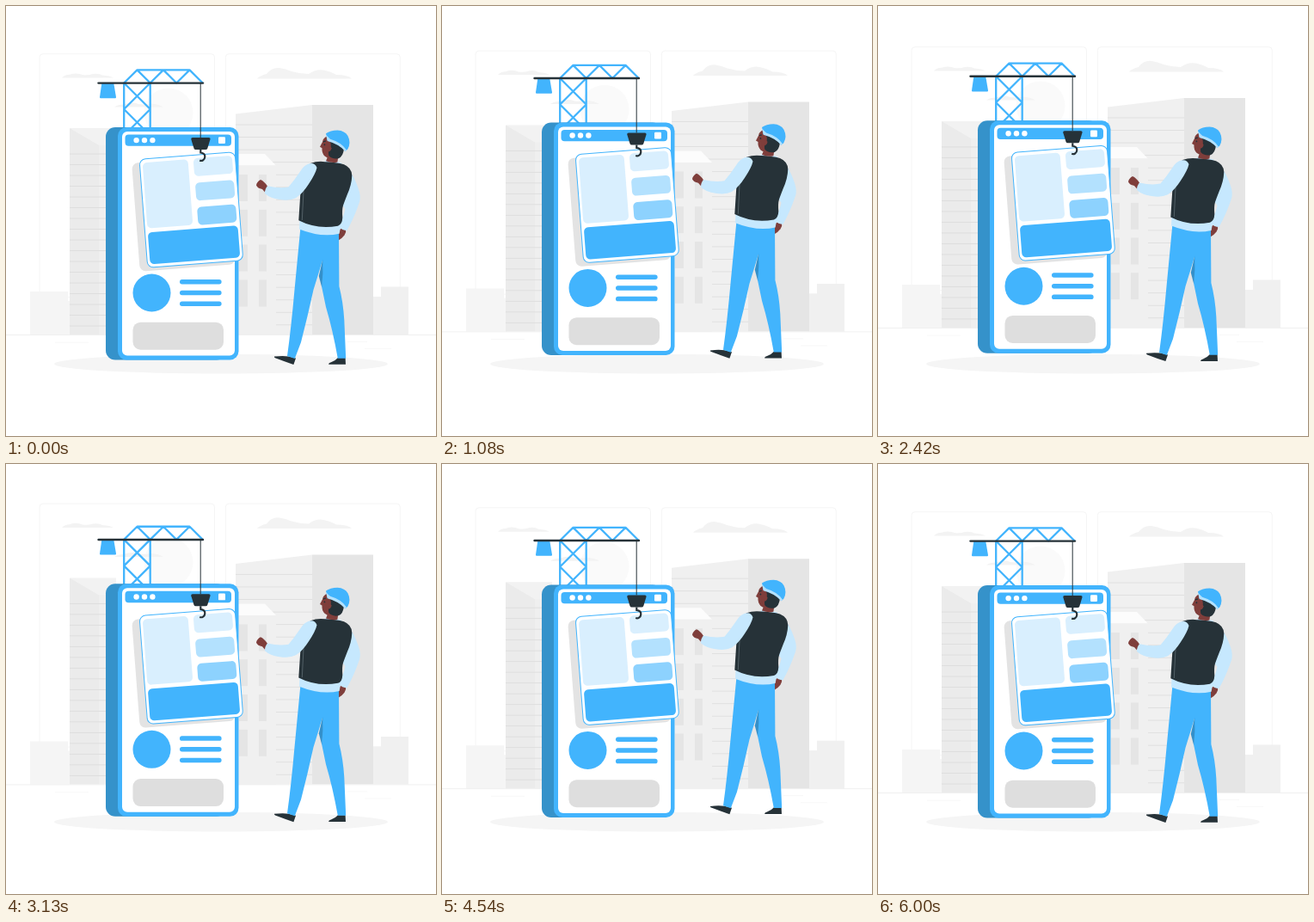
An HTML page for the animation above (6.04 s loop, 500 px wide and 500 px high).

```html
<!DOCTYPE html>
<html lang="en">
<head>
<meta charset="utf-8">
<title>Building an app</title>
<style>
  html, body { margin: 0; width: 100%; height: 100%; overflow: hidden; background: #fff; }
  svg { display: block; width: 100%; height: 100%; }
  .blue { fill: #42b4fd; }
  .dark { fill: #263238; }
  .skin { fill: #7f3e3b; }
  .shirt { fill: #c6e8fe; }
  .white { fill: #fff; }
</style>
</head>
<body>
<svg viewBox="0 0 500 500">
  <g id="city">
    <g fill="none" stroke="#f5f5f5">
      <rect x="39" y="55.7" width="203.5" height="283" rx="4"/>
      <rect x="255.3" y="55.7" width="203" height="283" rx="4"/>
    </g>
    <circle cx="189" cy="124" r="28.5" fill="#fafafa"/>
    <g fill="#f3f3f3">
      <path d="M65 83.5Q68 80 74 79.8Q82 77 89 80Q95 81 101 79Q108 78 112 80.5Q121 81 125 83.5Z"/>
      <path d="M292 84.5Q295 81 303 79Q309 71 318 72Q325 73 332 76Q342 79 352 79Q360 73 369 74.5Q378 76 384 80Q398 80 402 84.5Z"/>
      <path d="M126 117.5Q130 114.5 137 114.5Q146 111 154 114Q162 115 168 113.5Q178 114 183 117.5Z"/>
    </g>
    <path d="M28 332H72V343H76V382H28Z" fill="#f5f5f5"/>
    <path d="M74 142H128V170H108Z" fill="#f2f2f2"/>
    <path d="M74 142L108 162V382H74Z" fill="#ebebeb"/>
    <path d="M108 162H128V382H108Z" fill="#efefef"/>
    <path id="leftLines" fill="none" stroke="#dedede"/>
    <path d="M427 338H436V326.5H468V382H427Z" fill="#f0f0f0"/>
    <path d="M267 125.5L356 115V382H267Z" fill="#f0f0f0"/>
    <path d="M356 115H427V382H356Z" fill="#e5e5e5"/>
    <path id="rightLines" fill="none" stroke="#e0e0e0"/>
    <path d="M260 172H301L314 185.5H260Z" fill="#fcfcfc"/>
    <path d="M260 185.5H314V382H260Z" fill="#f0f0f0"/>
    <path id="panes" fill="#e5e5e5"/>
    <path d="M0 382.5H500" stroke="#ededed" stroke-width=".8"/>
    <path d="M57 391.2H96M417 398.6H448M397 390.5H420" stroke="#f3f3f3" stroke-width=".6"/>
  </g>

  <ellipse cx="250" cy="416.2" rx="194" ry="11.3" fill="#f5f5f5"/>

  <g id="phone">
    <g fill="none" stroke="#42b4fd" stroke-width="2.3" stroke-linejoin="round">
      <path d="M137.2 89V145M167.7 89V145M137.2 89.5L167.7 120L137.2 150.5M167.7 89.5L137.2 120L167.7 150.5"/>
      <path d="M137.2 89.5L152.5 74.4L167.7 89.5L183 74.4L198.2 89.5L213.5 74.4L228.7 89.5M152.5 74.4H213.5"/>
    </g>
    <path class="blue" d="M111.3 90H125.3L128 106Q128 107.2 127 107.2H110Q109 107.2 109 106Z"/>
    <path d="M107.5 89.6H229" stroke="#263238" stroke-width="2.4" stroke-linecap="round"/>

    <rect x="116" y="141" width="140" height="270.5" rx="11" fill="#3592ca"/>
    <rect class="blue" x="130" y="141" width="140.5" height="270.5" rx="10"/>
    <rect class="white" x="135" y="146" width="131" height="260.5" rx="6"/>
    <rect class="blue" x="138.5" y="149.5" width="123.5" height="13.3" rx="4"/>
    <g class="white">
      <circle cx="151.6" cy="156.1" r="3.2"/>
      <circle cx="161" cy="156.1" r="3.2"/>
      <circle cx="170.4" cy="156.1" r="3.2"/>
      <rect x="247" y="152.2" width="8" height="7.8" rx="1.2"/>
    </g>
    <circle class="blue" cx="169.5" cy="333.5" r="22"/>
    <g class="blue">
      <rect x="202" y="318" width="48.6" height="5.5" rx="2.7"/>
      <rect x="202" y="330.7" width="48.6" height="5.5" rx="2.7"/>
      <rect x="202" y="343.4" width="48.6" height="5.5" rx="2.7"/>
    </g>
    <rect x="147.5" y="367.7" width="105.5" height="32" rx="9" fill="#dedede"/>

    <rect x="-55.7" y="-63.2" width="111.4" height="126.4" rx="7" fill="#e3e3e3" transform="translate(206.5 241.5) rotate(-4.4)"/>
    <g transform="translate(215.4 237) rotate(-4.4)">
      <rect x="-55.7" y="-63.2" width="111.4" height="126.4" rx="7" fill="#fff" stroke="#42b4fd"/>
      <rect x="-52.4" y="-58.9" width="53" height="76.6" rx="5" fill="#d9effe"/>
      <rect x="6.8" y="-59.4" width="45.2" height="21" rx="5" fill="#d9effe"/>
      <rect x="6.8" y="-31" width="45.2" height="21" rx="5" fill="#b3e1fe"/>
      <rect x="6.8" y="-2.6" width="45.2" height="21" rx="5" fill="#8dd2fe"/>
      <rect class="blue" x="-52.5" y="22.3" width="105" height="37.2" rx="5"/>
    </g>

    <path d="M226.2 90V153" stroke="#263238"/>
    <path class="dark" d="M217 153H235.8Q238 153 237.5 155L234.3 165.5Q233.8 167 232 167H220.6Q219 167 218.5 165.5L215.3 155Q214.8 153 217 153Z"/>
    <path d="M226.3 167V170.5C230 171 231.5 173 231.3 175.5C231 179 228 180.6 225.2 179.6" fill="none" stroke="#263238" stroke-width="2.2"/>
  </g>

  <g id="man">
    <path class="dark" d="M312 407.6Q322 406.5 328.5 407.5L337 409.5L334.4 417Q324 413.5 313 409.3Q311.5 408.5 312 407.6Z"/>
    <path class="dark" d="M375.2 416.8Q375 415 378 414.3Q383 412.5 386 409H394.6L395 416.8Z"/>
    <path class="skin" d="M386 262Q390 256.5 395 259.5Q396 263 393.5 266.5Q391 270 386.5 272.5Z"/>
    <path class="blue" d="M342.5 257L387 262L387.4 326Q392 344 393.3 365L395.2 409.7H385.8Q380 377 372 350L367 326L368 296L357.5 330Q351 360 343 391L335.8 410L327 407Q331.5 375 335.5 330Z"/>
    <path d="M368.2 295L363.8 314L367.2 327Q369 310 368.2 295Z" fill="#3490ca"/>
    <path class="shirt" d="M398 190Q405 198 410 213Q413 222 411 228Q405 246 396.5 261Q391 261 387 256.5Q393 244 394.5 236L389 228L395 210Z"/>
    <path class="shirt" d="M341.5 248L390 252L387.6 264.8Q366 269.5 341 259.5Z"/>
    <path class="shirt" d="M371.5 179.5Q381 179 390 182.5L391 186L369 184Z"/>
    <path class="dark" d="M354 183Q362 180 371 181.2Q384 181.5 393 184.2Q402 188 402.3 197Q402 208 396.5 220Q393 229 392 232Q390.5 237 391.3 246Q391 254 386 255.7Q361 260 340.3 249.3L342.2 220L347 194Z"/>
    <path d="M346.2 211L344.3 249" stroke="#718087" stroke-width=".6"/>
    <path class="skin" d="M304 209.5Q300 203.5 296 202Q291.5 204.5 291 208.5Q292.5 212 298 213L301.5 217Z"/>
    <path class="shirt" d="M352 183.5Q359 181.5 361.5 188Q360 195 352 207Q345 218 337 223.2Q330 227 318 225Q307 223.5 301 218Q300.8 213 304 209.3Q318 212.5 328.5 210.5Q335 203 342 192.5Q346.5 185 352 183.5Z"/>
    <path class="skin" d="M374 151Q368 154 368.3 157.5L365 163.8L367.5 165.3Q367 171 370.5 174.6Q373 176.2 373.6 176.5L372 180.3Q379 183 385.4 181.5L387 170L386 156Z"/>
    <path class="dark" d="M376 156Q390 160 393 166Q392 175 386.7 177.2Q379 178.5 375.2 173.7Q374.2 168 377.5 164.7Q378.7 160.5 376 156Z"/>
    <path class="skin" d="M374.5 164Q377.7 162.5 378.5 165.3Q378 169 375 169.3Z"/>
    <path d="M368.8 157.8L371.8 157M369.8 160.5L371 162" fill="none" stroke="#263238" stroke-width="1.3"/>
    <path class="blue" d="M372 148.3Q377 144.5 385.5 144.5Q394 145 397.5 151Q401.5 159 397.3 166.5L394.5 169Q388 160 373.5 156Z"/>
    <path d="M372 149.5Q374.5 152.5 377 154.7Q390 158.5 396 167.4L394.5 169Q387 160.5 373.7 157Z" fill="#b3e1fe"/>
  </g>
</svg>
<script>
  const LOOP = 6040;
  const RATE = 24 / 1000;
  const RISE = 10;
  const byId = id => document.getElementById(id);

  // Joins one path fragment per index
  const repeat = (count, draw) => Array.from({ length: count }, (_, i) => draw(i)).join('');

  byId('leftLines').setAttribute('d', repeat(17, i => `M74 ${172 + 12.5 * i}H116`));
  byId('rightLines').setAttribute('d', repeat(17, i => `M267 ${138 + 14.55 * i}H356`));
  byId('panes').setAttribute('d', repeat(4, i => {
    const y = 196 + 40.8 * i;
    return `M271 ${y}h10v31h-10zM294 ${y}h9v31h-9z`;
  }));

  const floats = [
    { part: byId('city'), period: 6000 },
    { part: byId('phone'), period: 1500 },
    { part: byId('man'), period: 3000 }
  ];

  // Linear rise and fall, back at rest after one period
  function lift(time, period) {
    const phase = (time % period) / period;
    return RISE * (1 - Math.abs(1 - 2 * phase));
  }

  function render(ms) {
    const time = Math.floor((ms % LOOP + 5) * RATE) / RATE;
    for (const { part, period } of floats) {
      part.setAttribute('transform', `translate(0 ${-lift(time, period).toFixed(3)})`);
    }
  }

  const start = performance.now();
  function tick() {
    render(performance.now() - start);
    requestAnimationFrame(tick);
  }
  tick();
</script>
</body>
</html>
```
